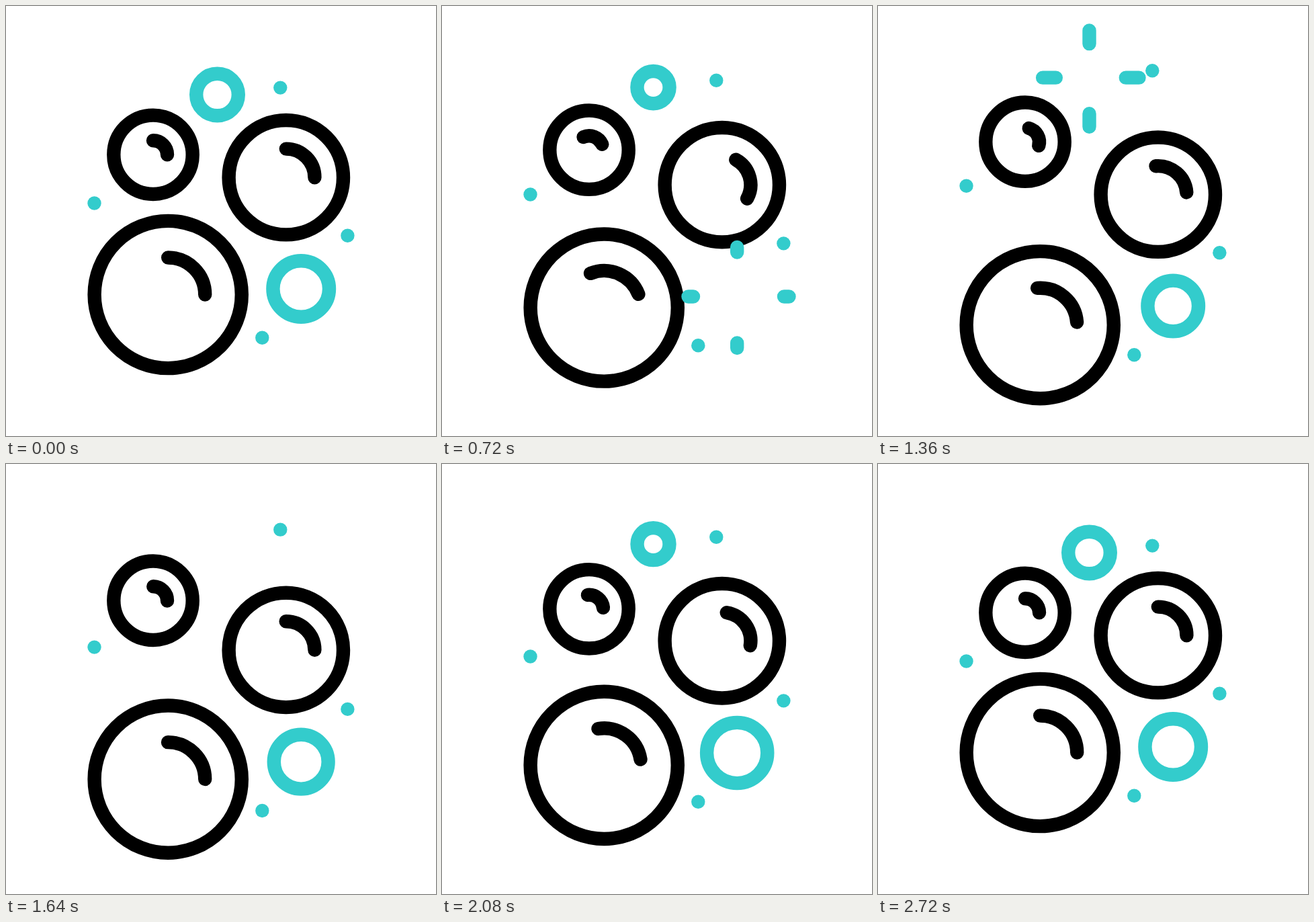
These frames come from a looping animation (640 px wide and 640 px high, 2.84 s). An HTML page:

```html
<!DOCTYPE html>
<html lang="en">
<head>
<meta charset="utf-8">
<title>Bubbles</title>
<style>
  html, body { margin: 0; width: 100%; height: 100%; overflow: hidden; background: #fff; }
  svg { display: block; width: 100%; height: 100%; }
  .line { fill: none; stroke: #000; stroke-width: 20.4; stroke-linecap: round; }
  .teal { stroke: #33cccc; }
  .dot { fill: #33cccc; }
</style>
</head>
<body>
<svg id="stage" viewBox="0 0 640 640"></svg>
<script>
const LOOP = 2840, STEP = 40, REST = 160;
const stage = document.getElementById('stage');

const clamp = u => Math.min(1, Math.max(0, u));

// Eased rise from 0 to 1 between two times.
function ramp(t, from, to) {
  const u = clamp((t - from) / (to - from));
  return u * u * (3 - 2 * u);
}

// Eased rise and fall: 0 at the ends, 1 at the peak.
const bump = (t, from, peak, to) => ramp(t, from, peak) - ramp(t, peak, to);

// A float is one trip of a given height and back.
const trip = (height, from, peak, to) => t => height * bump(t, from, peak, to);
const rise = trip(-25.6, 130, 1440, 2725);
const sink = trip(25.5, 150, 1375, 2550);

// Highlights swing out, swing back past rest, then echo softly.
const swing = (out, back, echo) => t =>
  out * bump(t, 190, 750, 1120) +
  back * bump(t, 750, 1120, 1700) +
  echo * bump(t, 1640, 2140, 2700);

// Rings breathe one way twice, with the opposite breath between.
const breath = (first, between) => t =>
  first * (bump(t, 130, 760, 1340) + bump(t, 1340, 2080, 2720)) +
  between * bump(t, 760, 1340, 2080);

const bubbles = [
  { x: 219, y: 221.3, r: 58.7, arc: 21, move: trip(-19.6, 200, 1480, 2400), turn: swing(-24, 25, -6) },
  { x: 416.8, y: 255.2, r: 85.2, arc: 42.6, move: trip(25.5, 190, 1360, 2510), turn: swing(29, -7, 9.8) },
  { x: 241.2, y: 429.5, r: 109.6, arc: 55, move: trip(45.2, 190, 1355, 2660), turn: swing(-21.7, -6.8, -9.5) }
];

const dots = [
  { x: 408.3, y: 121.6, move: rise },
  { x: 131.5, y: 293.5, move: trip(-25.8, 120, 1315, 2480) },
  { x: 508.4, y: 341.8, move: trip(25.5, 110, 1412, 2612) },
  { x: 381.3, y: 493.8, move: sink }
];

// Each ring pops into four rays, then returns.
const rings = [
  { x: 314.5, y: 132, r: 31.3, pop: 1240, from: 52, to: 93, move: rise, grow: breath(-7.3, 5.5) },
  { x: 439.2, y: 421, r: 41.8, pop: 680, from: 67.5, to: 114.5, move: sink, grow: breath(3.3, -4) }
];

function add(tag, attrs, parent = stage) {
  const el = document.createElementNS('http://www.w3.org/2000/svg', tag);
  for (const key in attrs) el.setAttribute(key, attrs[key]);
  return parent.appendChild(el);
}

for (const b of bubbles) {
  b.group = add('g', {});
  add('circle', { class: 'line', r: b.r }, b.group);
  b.shine = add('path', { class: 'line', d: `M0 ${-b.arc}A${b.arc} ${b.arc} 0 0 1 ${b.arc} 0` }, b.group);
}
for (const d of dots) d.el = add('circle', { class: 'dot', cx: d.x, r: 10.2 });
for (const g of rings) {
  g.el = add('circle', { class: 'line teal', cx: g.x });
  g.rays = add('path', { class: 'line teal' });
}

function rayPath(x, y, a, b) {
  const dx = 2.3, dy = 1.5;
  return [-1, 1].map(s =>
    `M${x + s * a + dx} ${y}H${x + s * b + dx}` +
    `M${x} ${y + s * a + dy}V${y + s * b + dy}`).join('');
}

function draw(t) {
  for (const b of bubbles) {
    b.group.setAttribute('transform', `translate(${b.x} ${b.y + b.move(t)})`);
    b.shine.setAttribute('transform', `rotate(${b.turn(t)})`);
  }
  for (const d of dots) d.el.setAttribute('cy', d.y + d.move(t));
  for (const g of rings) {
    const y = g.y + g.move(t), age = t - g.pop;
    g.el.setAttribute('cy', y);
    g.el.setAttribute('r', g.r + g.grow(t));
    g.el.setAttribute('visibility', age > 0 && age < 600 ? 'hidden' : 'visible');

    const reach = delay => g.from + (g.to - g.from) * clamp((age - delay) / 250);
    const head = reach(0), tail = reach(130);
    g.rays.setAttribute('d', head > tail ? rayPath(g.x, y, tail, head) : '');
  }
}

function tick() {
  const t = Math.floor(performance.now() % LOOP / STEP) * STEP;
  draw(t < REST ? 0 : t);
  requestAnimationFrame(tick);
}
tick();
</script>
</body>
</html>
```
